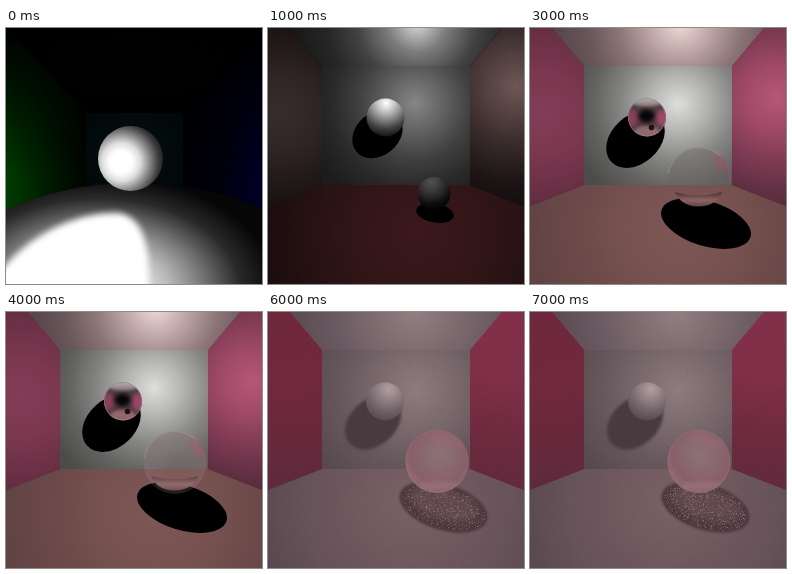
Recreate the animation shown at these times as an HTML page with a canvas. Size 256 by 256 pixels, loop 8000 ms.

```html
<!DOCTYPE html>
<html lang="en">
<head>
<meta charset="utf-8">
<title>Ray traced room</title>
<style>
html, body { margin: 0; width: 100%; height: 100%; overflow: hidden; background: #000; }
canvas { display: block; width: 256px; height: 256px; }
</style>
</head>
<body>
<canvas id="stage" width="256" height="256"></canvas>
<script>
const c = document.getElementById('stage').getContext('2d');

// Gradients with evenly spaced stops.
function stops(g, colors) {
  colors.forEach((col, i) => g.addColorStop(i / (colors.length - 1), col));
  return g;
}
const lin = (x0, y0, x1, y1, ...cols) => stops(c.createLinearGradient(x0, y0, x1, y1), cols);
const rad = (x, y, r, ...cols) => stops(c.createRadialGradient(x, y, 0, x, y, r), cols);

function poly(fill, ...p) {
  c.beginPath();
  for (let i = 0; i < p.length; i += 2) c.lineTo(p[i], p[i + 1]);
  c.fillStyle = fill;
  c.fill();
}

function shape(d, fill, blur = 0) {
  c.save();
  if (blur) c.filter = `blur(${blur}px)`;
  c.fillStyle = fill;
  c.fill(new Path2D(d));
  c.restore();
}

function oval(x, y, rx, ry, deg, fill, blur = 0) {
  c.save();
  if (blur) c.filter = `blur(${blur}px)`;
  c.beginPath();
  c.ellipse(x, y, rx, ry, deg * Math.PI / 180, 0, 7);
  c.fillStyle = fill;
  c.fill();
  c.restore();
}

const ball = (x, y, r, fill) => oval(x, y, r, r, 0, fill);

function arc(x, y, r, from, to, color, width) {
  c.beginPath();
  c.arc(x, y, r, from, to);
  c.strokeStyle = color;
  c.lineWidth = width;
  c.stroke();
}

function inside(x, y, r, draw) {
  c.save();
  c.beginPath();
  c.arc(x, y, r, 0, 7);
  c.clip();
  draw();
  c.restore();
}

function random(seed) {
  return () => (seed = seed * 16807 % 2147483647) / 2147483647;
}

function grain(n, seed, alpha) {
  const rnd = random(seed);
  for (let i = 0; i < n; i++) {
    c.fillStyle = i % 2 ? `rgba(255,225,230,${alpha})` : `rgba(20,0,8,${alpha})`;
    c.fillRect(rnd() * 256 | 0, rnd() * 256 | 0, 1, 1);
  }
}

// Bright specks scattered over a tilted ellipse.
function specks(x, y, rx, ry, deg, n, seed, edge) {
  const rnd = random(seed);
  const cos = Math.cos(deg * Math.PI / 180), sin = Math.sin(deg * Math.PI / 180);
  for (let i = 0; i < n; i++) {
    const a = rnd() * 6.283, d = Math.pow(rnd(), edge);
    const u = Math.cos(a) * d * rx, v = Math.sin(a) * d * ry;
    c.fillStyle = `rgba(205,170,178,${0.06 + rnd() * 0.24})`;
    c.fillRect(x + u * cos - v * sin | 0, y + u * sin + v * cos | 0, 1, 1);
  }
}

function room(back, ceiling, left, right, floor) {
  poly(floor, 0, 178, 54, 157, 202, 157, 256, 178, 256, 256, 0, 256);
  poly(ceiling, 22, 0, 234, 0, 202, 38, 54, 38);
  poly(left, 0, 0, 22, 0, 54, 38, 54, 157, 0, 178);
  poly(right, 256, 0, 234, 0, 202, 38, 202, 157, 256, 178);
  poly(back, 54, 38, 202, 38, 202, 157, 54, 157);
}

function globe() {
  c.fillStyle = '#000';
  c.fillRect(0, 0, 256, 256);
  oval(128, 0, 120, 70, 0, rad(128, 0, 110, '#090a09', '#000'));
  poly(lin(0, 0, 82, 0, '#003c00', '#001c00', '#000200'), 0, 0, 80, 85, 80, 160, 0, 190);
  poly(lin(176, 0, 256, 0, '#000003', '#00000e', '#000026'), 256, 0, 177, 85, 177, 160, 256, 190);
  poly(lin(0, 0, 0, 150, '#000', 'rgba(0,0,0,.55)', 'rgba(0,0,0,0)'), 0, 0, 256, 0, 256, 150, 0, 150);
  poly(rad(128, 125, 68, '#031012', '#010607'), 80, 85, 177, 85, 177, 165, 80, 165);

  const ground = 'M0 182Q60 155 128 155Q196 155 256 180V256H0Z';
  c.save();
  c.clip(new Path2D(ground));
  shape(ground, '#060606');
  c.translate(92, 262);
  c.scale(1.55, 1);
  ball(0, 0, 115, rad(0, 0, 115, '#fff', '#eee', '#b8b8b8', '#727272', '#292929', '#060606'));
  c.restore();
  shape('M-8 246C22 208 68 184 112 185C137 188 145 218 142 266H-8Z', '#fff', 3);
  ball(124.5, 130.5, 32.5, rad(115, 134, 47, '#fff', '#fff', '#e0e0e0', '#8c8c8c', '#3c3c3c', '#101010'));
  ball(115, 134.5, 16, rad(115, 134.5, 16, '#fff', '#fff', 'rgba(255,255,255,0)'));
}

function spotlit() {
  room(
    rad(147, 75, 112, '#868686', '#636363', '#404040', '#292929', '#1c1c1c'),
    rad(149, -6, 120, '#dcdcdc', '#7c7c7c', '#424242', '#262626', '#1a1a1a'),
    rad(14, 85, 110, '#382d2c', '#2f2524', '#1f1817', '#120d0d'),
    rad(248, 58, 125, '#6e5656', '#523f3f', '#352828', '#1e1616', '#120c0c'),
    rad(150, 205, 160, '#3b181b', '#341618', '#271213', '#1a0c0d'));
  oval(109.5, 106, 27.5, 21.5, -40, '#000');
  ball(117.5, 89.5, 19, rad(118, 75, 34, '#fff', '#c6c6c6', '#848484', '#404040', '#121212'));
  oval(167, 185, 19, 9.5, 10, '#000');
  ball(166, 165.5, 16.5, rad(163, 154, 29, '#505050', '#404040', '#282828', '#0e0e0e', '#000'));
}

function evenlit() {
  room(
    rad(145, 78, 112, '#6c6c6c', '#606060', '#505050', '#404040'),
    rad(145, 0, 120, '#707070', '#606060', '#4e4e4e', '#444'),
    rad(14, 85, 120, '#544949', '#4c4242', '#3f3737', '#363030'),
    rad(248, 65, 130, '#655858', '#594d4d', '#483e3e', '#393131'),
    rad(140, 205, 160, '#4e3033', '#493033', '#402a2c', '#34292a'));
  oval(109.5, 106, 27.5, 21.5, -40, '#000');
  ball(117.5, 89.5, 19, rad(118, 77, 34, '#8d8d8d', '#808080', '#666', '#484848'));
  oval(167, 185, 19, 9.5, 10, '#000');
  ball(166, 165.5, 16.5, rad(163, 154, 30, '#666', '#5c5c5c', '#444', '#1e1e1e', '#000'));
}

function mirrorBall() {
  ball(117, 89.5, 19, '#4c3b40');
  inside(117, 89.5, 19, () => {
    oval(117, 73, 16, 6, 0, lin(0, 70, 0, 80, '#bcb0b0', '#786a6c'), 1.5);
    oval(102, 90, 6, 9, 0, '#8c4059', 2);
    oval(132, 90, 6, 9, 0, '#9c4866', 2);
    oval(117, 104, 13, 6.5, 0, '#916869', 1.5);
    oval(116.5, 88, 8, 6.5, 0, '#060406', 2);
  });
  ball(121.5, 99.5, 2.8, '#1c1011');
  arc(117, 89.5, 18.5, 0, 7, 'rgba(165,152,154,.55)', 0.8);
}

function clearGlass(tint) {
  inside(169, 150.5, 31.5, () => {
    poly('rgba(105,98,98,.4)', 137, 118, 201, 118, 201, 157, 137, 157);
    oval(190, 136, 4, 11, -35, 'rgba(174,72,100,.4)', 2);
    shape('M145 164Q168 171 192 164Q187 178 168 178.5Q151 178 145 164Z',
      lin(0, 165, 0, 179, '#50373a', '#8a6463', '#5e4344'));
    if (tint) ball(169, 150.5, 32, tint);
  });
  arc(169, 150.5, 31, 3.3, 5.5, 'rgba(160,154,155,.6)', 1.1);
  arc(169, 150.5, 31, 5.4, 6.4, 'rgba(175,85,112,.6)', 1.2);
}

function chrome(tint) {
  room(
    rad(148, 76, 112, '#dededc', '#b4b4b2', '#868685', '#636362', '#4c4c4b'),
    rad(150, -5, 122, '#f0dcda', '#bea7a6', '#8c7677', '#69575a', '#57474b'),
    rad(14, 85, 115, '#843c56', '#7c3850', '#6a3045', '#582839'),
    rad(246, 70, 125, '#b65676', '#a04a68', '#7f3b53', '#603042', '#4c2635'),
    rad(150, 200, 160, '#7e5755', '#775250', '#6b4948', '#604243'));
  oval(105.5, 111.5, 33, 24, -42, '#000');
  mirrorBall();
  oval(176, 195.5, 46.5, 22.5, 17, '#000');
  clearGlass(tint);
}

function softRoom(floor) {
  room(
    rad(148, 78, 115, '#8d7c7f', '#7a6a6e', '#66575c', '#574a4f'),
    rad(147, 0, 125, '#937f82', '#7d6b6f', '#685860', '#5a4a50'),
    lin(15, 15, 30, 168, '#6e273b', '#72283d', '#6a283c', '#602a3c'),
    lin(240, 15, 218, 168, '#82304a', '#802f48', '#702a40', '#622a3c'),
    floor);
  oval(105, 110.5, 31.5, 23, -42, '#483a3f', 1.5);
  ball(117, 89.5, 19, rad(121, 77, 35, '#b0a0a2', '#908084', '#6e5f64', '#504349'));
}

function softGlass(...cols) {
  ball(169, 149.5, 31.5, rad(172, 143, 43, ...cols));
  oval(178, 129, 17, 5, 20, 'rgba(180,105,128,.25)', 3);
  arc(169, 149.5, 31, 0, 7, 'rgba(170,130,140,.25)', 1);
}

function glossy() {
  softRoom(lin(0, 157, 0, 256, '#7a6168', '#74585f', '#6d4c56', '#66434e'));
  oval(105, 199, 31, 22, 40, 'rgba(65,42,51,.28)', 2.5);
  shape('M112 205Q132 204 134 226Q135 246 122 251Q108 240 106 222Z', 'rgba(68,42,51,.16)', 3);
  shape('M138 185Q135 214 150 232Q178 246 202 218L207 190Z', 'rgba(67,42,51,.16)', 3);
  softGlass('rgba(145,114,121,.6)', 'rgba(138,103,111,.6)', 'rgba(135,86,99,.6)', 'rgba(155,105,118,.6)');
  oval(173, 190, 35, 15, 12, 'rgba(135,102,110,.35)', 2);
  specks(173, 190, 36, 15, 12, 600, 71, 0.5);
  grain(3000, 19, 0.05);
}

function matte(n, seed) {
  softRoom(rad(142, 190, 158, '#786167', '#70595f', '#665259', '#58474f'));
  oval(175.5, 195, 45.5, 23, 17, '#4b383d', 1);
  oval(176, 192, 36, 15, 17, 'rgba(116,88,95,.5)', 3);
  specks(175.5, 195, 43, 21, 17, n, seed, 0.5);
  softGlass('rgba(146,116,122,.88)', 'rgba(142,108,115,.88)', 'rgba(140,96,106,.88)', 'rgba(160,114,125,.88)');
  oval(170, 173, 19, 4, 0, 'rgba(175,142,149,.35)', 2);
  grain(2400, seed + 5, 0.04);
}

const scenes = [
  globe, spotlit, evenlit,
  () => chrome(),
  () => chrome(rad(169, 150, 33, 'rgba(170,150,153,.06)', 'rgba(180,135,148,.22)')),
  glossy,
  () => matte(800, 37),
  () => matte(900, 83)
];

let shown = -1;
const start = performance.now();
function tick(now) {
  const i = Math.floor(Math.max(0, now - start) / 1000) % scenes.length;
  if (i !== shown) scenes[shown = i]();
  requestAnimationFrame(tick);
}
tick(start);
</script>
</body>
</html>
```
